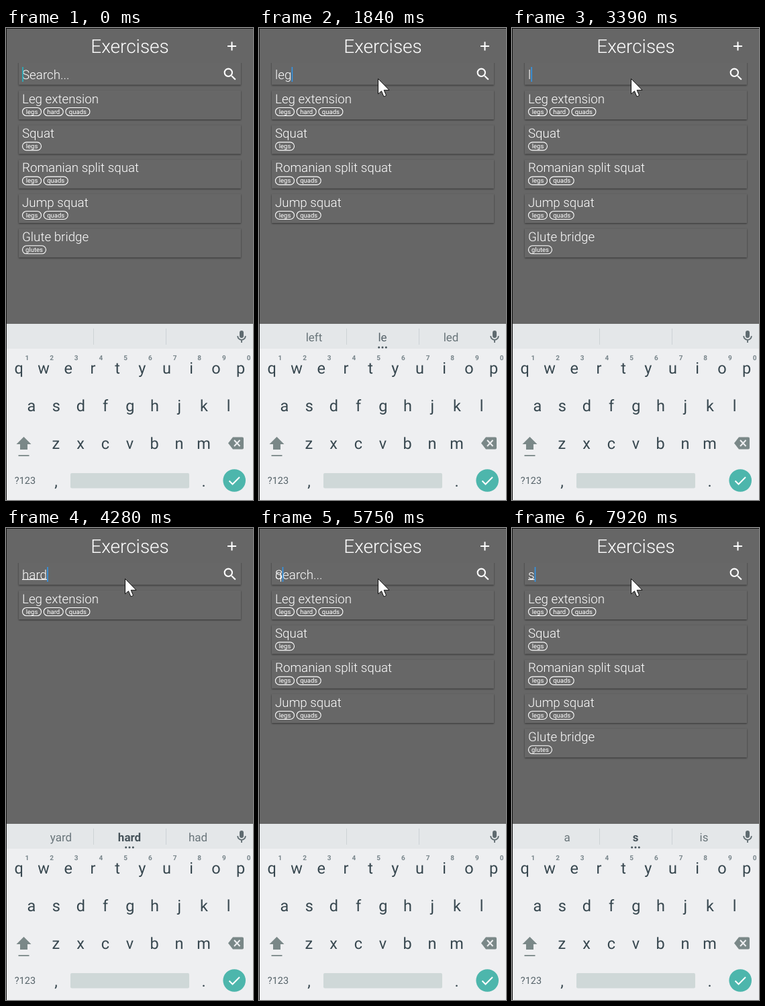
Recreate the animation shown at these times as an HTML page. Size 368 px wide and 702 px high, loop 7990 ms.

```html
<!DOCTYPE html>
<html lang="en">
<head>
<meta charset="utf-8">
<title>Exercise search</title>
<style>
html, body { margin: 0; width: 100%; height: 100%; overflow: hidden; background: #666; }
svg { display: block; width: 368px; height: 702px; font-family: Roboto, sans-serif; text-rendering: geometricPrecision; }
.app { fill: #fff; font-weight: 300; font-size: 18.8px; }
.card { fill: #676767; filter: drop-shadow(0 1.7px 1.2px rgba(0,0,0,.5)); }
.pill { fill: none; stroke: #fff; stroke-width: 1.1; }
.tag { font-size: 9.5px; font-weight: 400; text-anchor: middle; }
.key { fill: #37474f; font-size: 23.5px; text-anchor: middle; }
.digit { fill: #78858b; font-size: 10px; font-weight: 700; text-anchor: middle; }
.hint { fill: #69757a; font-size: 17px; text-anchor: middle; }
.hint.mid { fill: #56636a; }
.hint.bold { fill: #455259; font-weight: 700; }
</style>
</head>
<body>
<svg viewBox="0 0 368 702">
  <rect width="368" height="702" fill="#666"/>
  <g class="app">
    <text x="184.5" y="37" font-size="28" text-anchor="middle">Exercises</text>
    <path d="M336.5 20.5v13M330 27h13" stroke="#fff" stroke-width="2"/>
    <svg x="0" y="52" width="368" height="40"><rect class="card" x="19" y="-6" width="331" height="38.5"/></svg>
    <path transform="translate(321.5 56.5) scale(1.03)" d="M15.5 14h-.79l-.28-.27A6.47 6.47 0 0 0 16 9.5 6.5 6.5 0 1 0 9.5 16c1.61 0 3.09-.59 4.23-1.57l.27.28v.79l5 4.99L20.49 19zm-6 0a4.5 4.5 0 1 1 0-9 4.5 4.5 0 0 1 0 9z"/>
    <text id="placeholder" x="24" y="76">Search...</text>
    <text id="query" x="24" y="76"></text>
    <rect id="underline" x="24" y="76" height="1.2"/>
    <rect id="caret" y="58" width="1.6" height="22"/>
    <g id="list"></g>
  </g>
  <g id="keyboard">
    <rect y="440" width="368" height="262" fill="#eeeff1"/>
    <rect y="440" width="368" height="37" fill="#e4e7e9"/>
    <path d="M130.5 447v24M238.5 447v24" stroke="#cdd3d6"/>
    <g id="hints"></g>
    <g id="dots" fill="#455259"><circle cx="178.7" cy="475" r="1.5"/><circle cx="184" cy="475" r="1.5"/><circle cx="189.3" cy="475" r="1.5"/></g>
    <g fill="#5f6b70">
      <rect x="348" y="450" width="6" height="11" rx="3"/>
      <path d="M345.2 458a5.8 5.8 0 0 0 11.6 0M351 464v4" fill="none" stroke="#5f6b70" stroke-width="1.8"/>
    </g>
    <g fill="#7a8888">
      <path d="M26.5 608L37.5 619H32V627H21V619H15.5Z"/>
      <rect x="18.5" y="635" width="16" height="1.8"/>
      <path d="M338 608.5h14a2 2 0 0 1 2 2v14a2 2 0 0 1-2 2h-14l-7-9z"/>
    </g>
    <path d="M340 613l8.5 9M348.5 613l-8.5 9" stroke="#eeeff1" stroke-width="2"/>
    <text x="28.5" y="678" font-size="14.5" fill="#566369" text-anchor="middle">?123</text>
    <rect x="96" y="662" width="177" height="22.5" rx="2" fill="#cfd8d8"/>
    <circle cx="340.2" cy="673" r="16.8" fill="#4db6ac"/>
    <path d="M332.5 673.5l5 5 10.5-10.5" fill="none" stroke="#fff" stroke-width="2"/>
  </g>
  <path d="M0 .5H368M.5 0V702" stroke="#111"/>
  <path id="pointer" d="M.5 .5V23L5.5 18.8 9 27 12.6 25.4 9.2 17.4H17Z" fill="#fff" stroke="#111" stroke-linejoin="round"/>
</svg>
<script>
const LOOP = 7990;
const $ = id => document.getElementById(id);

function add(parent, tag, attrs, text = '') {
  const node = document.createElementNS('http://www.w3.org/2000/svg', tag);
  for (const name in attrs) node.setAttribute(name, attrs[name]);
  node.textContent = text;
  parent.append(node);
  return node;
}

const exercises = [
  ['Leg extension', 'legs hard quads'],
  ['Squat', 'legs'],
  ['Romanian split squat', 'legs quads'],
  ['Jump squat', 'legs quads'],
  ['Glute bridge', 'glutes']
];
const pillWidth = { legs: 28, hard: 29, quads: 36, glutes: 35 };

// time, typed text, suggestions, placeholder still showing
const steps = [
  [0, '', ''],
  [1360, 'l', '', true], [1430, 'l', ''], [1500, 'l', 'I l la'],
  [1570, 'le', 'I l la'], [1700, 'le', 'left le led'],
  [1770, 'leg', 'left le led'], [1910, 'leg', 'left leg legs'],
  [2050, 'legs', 'left leg legs'], [2180, 'legs', "lets legs leg's"],
  [2970, 'legs', ''], [3040, 'leg', ''], [3180, 'leg', 'left leg legs'],
  [3250, 'le', ''], [3390, 'l', ''], [3460, 'l', 'I l la'],
  [3530, '', ''],
  [3870, 'h', '', true], [3940, 'h', 'he h how'], [4010, 'ha', 'he h how'],
  [4080, 'har', 'has ha had'], [4150, 'hard', 'has ha had'], [4280, 'hard', 'yard hard had'],
  [4940, 'hard', ''], [5010, 'har', ''], [5150, 'ha', ''], [5290, 'h', ''],
  [5420, '', ''],
  [5750, 'q', '', true], [5820, 'qu', ''], [5890, 'qua', 'que qu quite'],
  [5960, 'quad', 'que qu quite'], [6040, 'quad', 'squad quad quadratic'],
  [6180, 'quads', 'squad quad quadratic'], [6310, 'quads', 'squads quads quad'],
  [6770, 'quads', ''], [6830, 'quad', ''], [6970, 'quad', 'squad quad quadratic'],
  [7040, 'quad', ''], [7110, 'qua', ''], [7250, 'qu', ''], [7380, 'q', ''],
  [7510, '', ''],
  [7780, 's', '', true], [7850, 's', ''], [7920, 's', 'a s is']
];
const caretOff = [[390, 890], [2640, 2970], [4740, 4940]];

function buildKeys() {
  const rows = [['qwertyuiop', 19.3, 513.5], ['asdfghjkl', 38, 569.5], ['zxcvbnm', 74.4, 625.5]];
  rows.forEach(([letters, left, y], row) => {
    [...letters].forEach((letter, i) => {
      const x = left + i * 36.7;
      add($('keyboard'), 'text', { class: 'key', x, y }, letter);
      if (row === 0) add($('keyboard'), 'text', { class: 'digit', x: x + 12, y: 493.5 }, (i + 1) % 10);
    });
  });
  add($('keyboard'), 'text', { class: 'key', x: 74.5, y: 682 }, ',');
  add($('keyboard'), 'text', { class: 'key', x: 294.5, y: 682 }, '.');
}

const cards = exercises.map(([name, tags]) => {
  const card = add($('list'), 'g', {});
  add(card, 'rect', { class: 'card', x: 19, y: 93, width: 331, height: 43 });
  add(card, 'text', { x: 24, y: 111.7 }, name);
  let x = 24.5;
  for (const tag of tags.split(' ')) {
    const width = pillWidth[tag];
    add(card, 'rect', { class: 'pill', x, y: 118.5, width, height: 12, rx: 6 });
    add(card, 'text', { class: 'tag', x: x + width / 2, y: 127.7 }, tag);
    x += width + 3.7;
  }
  return { card, content: (name + ' ' + tags).toLowerCase() };
});
const hints = [82, 184, 286].map(x => add($('hints'), 'text', { class: 'hint', x, y: 466 }));

function show(id, visible) {
  $(id).style.display = visible ? '' : 'none';
}

function applyStep([, text, words, ghost]) {
  $('query').textContent = text;
  show('placeholder', !text || ghost);
  const width = text ? $('query').getComputedTextLength() : 0;
  const suggestions = words.split(' ');
  const composing = text !== '' && suggestions[1] === text;
  $('caret').setAttribute('x', 24.2 + width);
  $('underline').setAttribute('width', width);
  show('underline', composing);
  show('dots', words);
  hints.forEach((hint, i) => { hint.textContent = suggestions[i] || ''; });
  hints[1].setAttribute('class', 'hint mid' + (composing ? ' bold' : ''));
  let row = 0;
  for (const { card, content } of cards) {
    const match = content.includes(text);
    card.style.display = match ? '' : 'none';
    if (match) card.setAttribute('transform', `translate(0 ${row++ * 51.33})`);
  }
}

function movePointer(time) {
  show('pointer', time >= 190);
  const tick = Math.floor((time - 190) / 70) / 9;
  const p = Math.max(0, Math.min(1, tick));
  const left = 1 - p * p * (3 - 2 * p);
  $('pointer').setAttribute('transform', `translate(${177 + 146 * left} ${75 + 514 * left})`);
}

let current;
function render(time) {
  const step = steps.findLast(([start]) => start <= time);
  if (step !== current) applyStep(current = step);
  show('caret', !caretOff.some(([from, to]) => time >= from && time < to));
  $('caret').setAttribute('fill', time < 1360 ? '#26b5c5' : '#3296e8');
  movePointer(time);
}

buildKeys();
const start = performance.now();
function frame() {
  render((performance.now() - start) % LOOP);
  requestAnimationFrame(frame);
}
frame();
</script>
</body>
</html>
```
